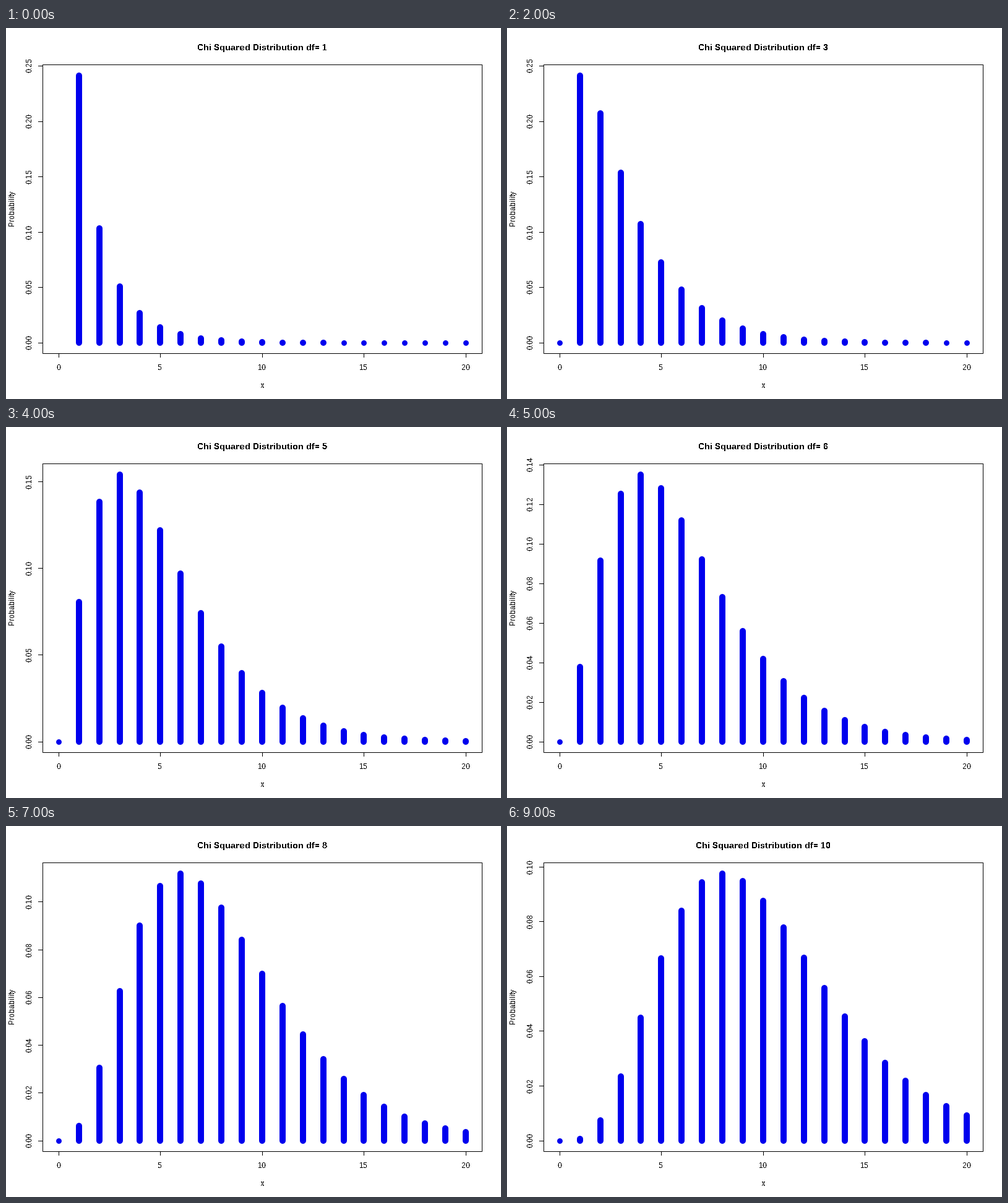
Recreate the animation shown at these times as a matplotlib script. Size 800x600 px, loop 10 s.

```python
import math

import matplotlib.pyplot as plt
from matplotlib.animation import FuncAnimation
from matplotlib.collections import LineCollection

DPI = 100
W, H = 800, 600
PX = 72 / DPI  # points per pixel

LEFT, TOP, RIGHT, BOTTOM = 59.04, 59.04, 769.76, 526.56
X_UNIT = (RIGHT - LEFT) / 1.08 / 20
X_ZERO = LEFT + 0.04 * 20 * X_UNIT
Y_SPAN = (BOTTOM - TOP) / 1.08
Y_ZERO = BOTTOM - 0.04 * Y_SPAN

# Crisp, fully hinted lettering
plt.rcParams.update({
    "font.family": "Liberation Sans",
    "text.hinting": "native",
    "text.hinting_factor": 1,
    "text.antialiased": False,
})
fig = plt.figure(figsize=(W / DPI, H / DPI), dpi=DPI, facecolor="white")
ax = fig.add_axes([0, 0, 1, 1])


def density(x, df):
    if x == 0:
        return {1: None, 2: 0.5}.get(df, 0.0)
    half = df / 2
    return x ** (half - 1) * math.exp(-x / 2) / (2 ** half * math.gamma(half))


def x_pixel(x):
    return math.floor(X_ZERO + x * X_UNIT)


def y_pixel(value, peak):
    return math.floor(Y_ZERO - Y_SPAN * value / peak)


def line(xs, ys):
    ax.plot(xs, ys, color="black", lw=PX, solid_capstyle="butt",
            solid_joinstyle="miter", snap=False)


def label(x, y, text, size=12, **kw):
    ax.text(x, y, text, fontsize=size * PX, color="black", ha="center",
            va="baseline", rotation_mode="anchor", **kw)


def draw_axes(peak):
    l, t, r, b = (math.floor(v) + 0.5 for v in (LEFT, TOP, RIGHT, BOTTOM))
    line([l, r, r, l, l, r], [t, t, b, b, t, t])

    for x in range(0, 21, 5):
        px = x_pixel(x)
        line([px + 0.5] * 2, [b, 533])
        label(px, 553, str(x))

    step = 0.1 if peak > 0.4 else 0.05 if peak > 0.15 else 0.02
    digits = 1 if step == 0.1 else 2
    for i in range(int(peak * 1.04 / step) + 1):
        py = y_pixel(i * step, peak)
        line([52, l], [py + 0.5] * 2)
        label(42, py - 0.5, f"{i * step:.{digits}f}", rotation=90)


def draw_bars(values, peak):
    base = y_pixel(0, peak)
    segments, widths = [], []
    for x, value in values:
        px, top = x_pixel(x), y_pixel(value, peak)
        if top == base:
            segments.append([(px + 0.5, base + 0.5), (px + 0.5, base + 0.49)])
            widths.append(9 * PX)
        else:
            segments.append([(px, base + 0.01), (px, top + 1)])
            widths.append(10 * PX)
    bars = LineCollection(segments, linewidths=widths, colors="#0000ee",
                          capstyle="round")
    bars.set_snap(False)
    ax.add_collection(bars, autolim=False)


def draw(frame):
    df = frame + 1
    ax.clear()
    ax.set_xlim(0, W)
    ax.set_ylim(H, 0)
    ax.axis("off")

    values = [(x, density(x, df)) for x in range(21)]
    values = [(x, v) for x, v in values if v is not None]
    peak = max(v for _, v in values)

    draw_bars(values, peak)
    draw_axes(peak)
    middle = (LEFT + RIGHT) / 2
    label(middle, 36, f"Chi Squared Distribution df= {df}", 14, weight="bold")
    label(middle, 582, "x")
    label(13, (TOP + BOTTOM) / 2 - 1, "Probability", rotation=90)
    return []


anim = FuncAnimation(fig, draw, frames=10, interval=1000,
                     init_func=lambda: draw(0), repeat=True, repeat_delay=0)
plt.show()
```
